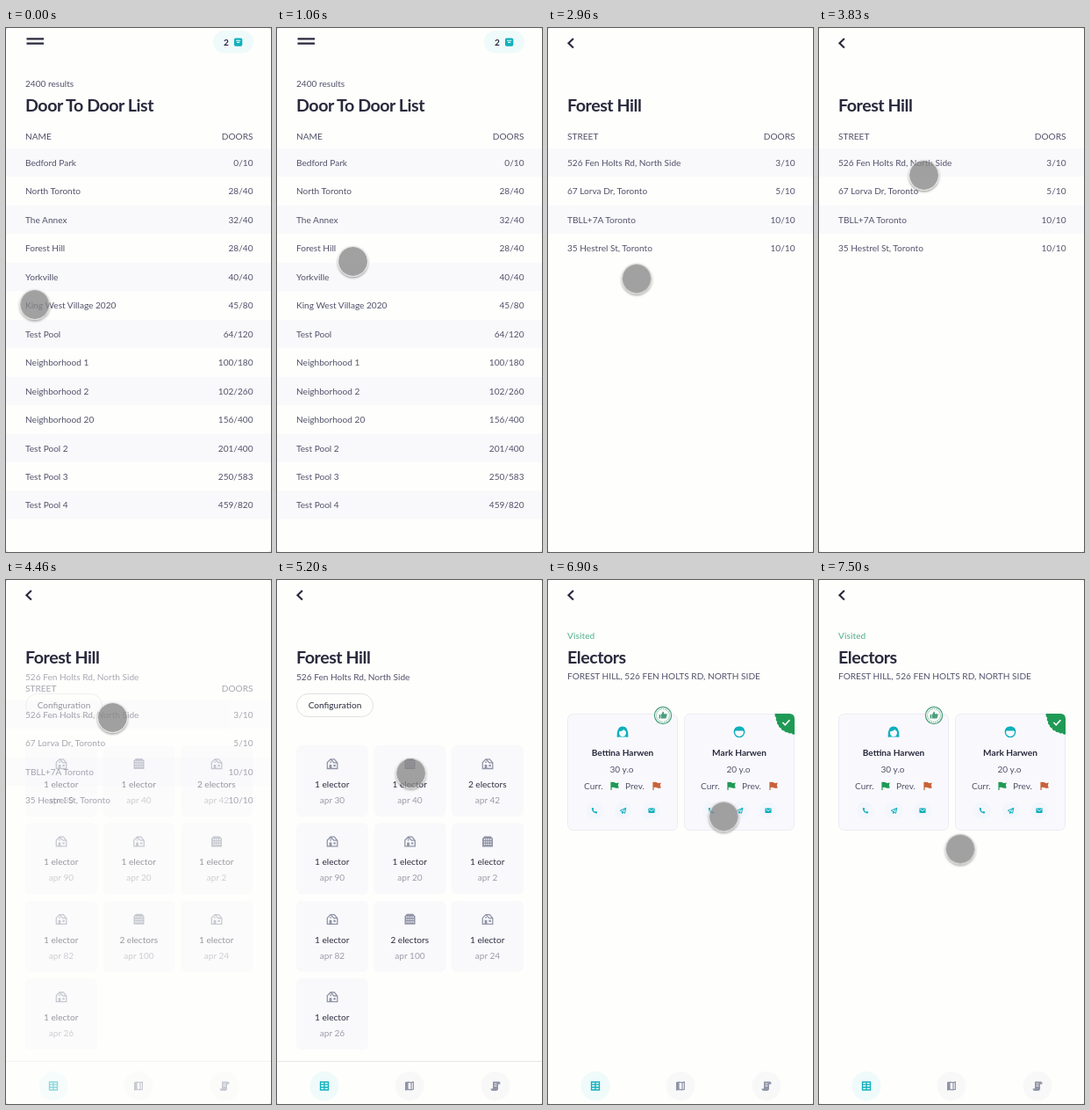
An HTML page for the animation above (8 s loop, 302 px wide and 596 px high).

```html
<!DOCTYPE html>
<html lang="en">
<head>
<meta charset="utf-8">
<title>Door to door list</title>
<style>
  html, body { margin: 0; width: 100%; height: 100%; overflow: hidden; background: #e2e2e2; }
  #stage { position: relative; width: 302px; height: 596px; overflow: hidden; }
  svg { position: absolute; inset: 0; display: block; }
  text { font: 10.1px Lato, sans-serif; fill: #52526b; }
  .title { font-size: 19.6px; font-weight: 700; letter-spacing: -.45px; fill: #29293d; }
  .bold { font-weight: 700; fill: #29293d; }
  .dark { fill: #2d2d40; }
  .pale { fill: #9c9cab; }
  .green { fill: #4fae88; letter-spacing: .1px; }
  .end { text-anchor: end; }
  .mid { text-anchor: middle; }
  .page { fill: #fefefc; }
  .soft { fill: #f9f9fb; }
  .line { fill: none; stroke: currentColor; }
  .teal { color: #0fb0bc; }
  .gray { color: #9094a6; }
  .fill { fill: currentColor; }

  #streets, #units, #people { animation: 8s linear infinite; }
  #streets { animation-name: streets; }
  #units { animation-name: units; }
  #people { animation-name: people; }
  @keyframes streets { 0%, 23.6% { opacity: 0 } 25%, 100% { opacity: 1 } }
  @keyframes units { 0%, 54.1% { opacity: 0 } 57.5%, 100% { opacity: 1 } }
  @keyframes people { 0%, 83.6% { opacity: 0 } 85.75%, 100% { opacity: 1 } }

  #cursor {
    position: absolute; left: -17.5px; top: -17.5px; width: 35px; height: 35px;
    box-sizing: border-box; border-radius: 50%;
    background: rgba(135, 135, 135, .78) padding-box;
    border: 1px solid rgba(225, 225, 225, .75);
    box-shadow: 0 1.5px 2.5px rgba(0, 0, 0, .36);
    animation: move 8s linear infinite, press 8s linear infinite;
  }
  @keyframes move {
    0% { translate: 32px 314px; animation-timing-function: ease-out }
    3.75%, 6.25% { translate: 80px 326px; animation-timing-function: ease-in }
    7.9% { translate: 85px 334px }
    9.75% { translate: 90px 312px }
    13.25% { translate: 86px 265px; animation-timing-function: ease-out }
    16.6%, 33.4% { translate: 84px 255px; animation-timing-function: ease-in-out }
    37% { translate: 100.5px 284.5px; animation-timing-function: ease-out }
    38.75%, 40.4% { translate: 102.5px 294px; animation-timing-function: ease-in }
    47.875% { translate: 119px 167px; animation-timing-function: ease-out }
    50%, 61.6% { translate: 121px 156px; animation-timing-function: ease-in }
    65% { translate: 152px 219px }
    67.9% { translate: 180px 271px }
    69% { translate: 186px 273px; animation-timing-function: ease-out }
    71.6%, 77.5% { translate: 195px 260.5px }
    77.875% { translate: 196.5px 259px; animation-timing-function: ease-out }
    79.5%, 83.75% { translate: 223.5px 245.5px; animation-timing-function: ease-in-out }
    89.5%, 92.9% { translate: 163px 304px }
    93.75%, 100% { translate: 160.5px 305.5px }
  }
  @keyframes press {
    0%, 17.1% { scale: 1 }
    17.5%, 23.7% { scale: .97 }
    24.6%, 52.1% { scale: 1 }
    52.5%, 54.1% { scale: .97 }
    55%, 80.9% { scale: 1 }
    81.25%, 83.7% { scale: .97 }
    84.2%, 100% { scale: 1 }
  }
</style>
</head>
<body>
<div id="stage">
  <svg id="scene" width="302" height="596" viewBox="0 0 302 596">
    <defs>
      <g id="back"><path class="line" d="M28.9 11.9 23.4 17.2l5.5 5.3" stroke-width="2.1" color="#29293d"/></g>
      <g id="house">
        <path class="line" d="M-5.7 5.5V-1.4L-2-5.2H2.4L5.8-1V5.5ZM-2-5.2 1.8-1.2H5.8" stroke-width="1.3"/>
        <path class="fill" d="M-3.4 1h2.8v4.5h-2.8zM1.4 1h2.4v2.2H1.4zM-2.7-2.6h1.6V-1h-1.6z"/>
      </g>
      <g id="tower">
        <path class="fill" d="M-6-3.4-3.6-6H3.6L6-3.4V6H-6z"/>
        <path d="M-4.2-2.4H4.6M-4.2.4H4.6M-4.2 3.2H4.6" stroke="#f9f9fb" stroke-width="1.3" stroke-dasharray="1.4 1"/>
      </g>
      <g id="table"><path class="line" d="M-4.5-4.5h9v9h-9zM-4.5-1.6h9M-4.5 1.5h9M0-4.5v9" stroke-width="1.3"/></g>
      <g id="map">
        <path class="line" d="M-4.4-3.8-1.6-4.4 1.6-3.8 4.4-4.4V3.8L1.6 4.4-1.6 3.8-4.4 4.4Z" stroke-width="1.2"/>
        <path class="fill" d="M-4.4-3.8-1.4-4.4V3.8L-4.4 4.4zM1.4-3.8 2.6-4V4.2L1.4 4.4z"/>
      </g>
      <g id="scroll">
        <path class="fill" d="M-3-5H4q1.4 0 1.4 1.6V-2H3V3.6Q3 5.4 1 5.4H-3.6Q-5.4 5.4-5.4 3.6V3H-3z"/>
        <path d="M-1.4-2.4H1.4M-1.4 0H1.4" stroke="#f8f8f9"/>
      </g>
      <g id="flag">
        <path class="fill" d="M-4.6-4.6h1.2V4.8h-1.2zM-3.4-4.2Q-1.4-5 .4-3.9T4.8-3.8L3.8-.8 4.8 2.2Q2 3 .2 2T-3.4 1.8z"/>
      </g>
      <g id="phone"><path class="fill" d="M-2.8-3-1.5-3.3-.7-1.5-1.5-.7Q-.9.8.7 1.5L1.5.7 3.3 1.5 3 2.8Q2.6 3.4 1.8 3.2-2.4 2.2-3.2-1.8-3.4-2.6-2.8-3z"/></g>
      <g id="plane"><path class="line" d="M-3.3 0 3.3-3 2 3-.6 1.4ZM-.6 1.4 3-2.7M-1 1.2V3.2L.6 2" stroke-width="1"/></g>
      <g id="mail">
        <rect class="fill" x="-3.6" y="-2.8" width="7.2" height="5.6" rx=".8"/>
        <path class="line" d="M-2.8-1.6 0 .3 2.8-1.6" color="#f3f8fc" stroke-width=".9"/>
      </g>
      <g id="woman">
        <path class="fill" d="M-6.4 5.4Q-7-6.4 0-6.4T6.4 5.4Q5.6 6.2 4 5.6H-4Q-5.6 6.2-6.4 5.4z"/>
        <path fill="#f9f9fd" d="M-4-.6Q0-1 1.6-3 2.6-1 4-.6 4.2 5 0 5T-4-.6z"/>
      </g>
      <g id="man">
        <circle class="line" r="5.6" stroke-width="1.4"/>
        <path class="fill" d="M-6.2.2Q-6.4-6.6 0-6.6T6.2.2L4.4-1.4H-4.4z"/>
      </g>
    </defs>
  </svg>
  <div id="cursor"></div>
</div>
<script>
  const text = (x, y, s, cls = '') => `<text x="${x}" y="${y}" class="${cls}">${s}</text>`;
  const title = s => text(22, 94.6, s, 'title');
  const icon = (id, x, y, cls = '') => `<use href="#${id}" x="${x}" y="${y}" class="${cls}"/>`;
  const dot = (x, y, r, fill) => `<circle cx="${x}" cy="${y}" r="${r}" fill="${fill}"/>`;
  const page = (id, body) =>
    `<g id="${id}"><rect class="page" width="302" height="596" rx="4"/>${body}</g>`;

  const list = (label, rows) =>
    text(22, 127.3, label) + text(281.5, 127.3, 'DOORS', 'end') +
    rows.map(([name, doors], i) => {
      const y = 137 + i * 32.45;
      const stripe = i % 2 ? '' : `<rect class="soft" y="${y}" width="302" height="32.4"/>`;
      return stripe + text(22, y + 20, name) + text(281.5, y + 20, doors, 'end');
    }).join('');

  const nav =
    dot(54, 575.5, 16.5, '#effafa') + dot(151, 575.5, 16.5, '#f8f8f9') + dot(249, 575.5, 16.5, '#f8f8f9') +
    icon('table', 54, 575.5, 'teal') + icon('map', 151, 575.5, 'gray') + icon('scroll', 249, 575.5, 'gray');

  const areas = [
    ['Bedford Park', '0/10'], ['North Toronto', '28/40'], ['The Annex', '32/40'],
    ['Forest Hill', '28/40'], ['Yorkville', '40/40'], ['King West Village 2020', '45/80'],
    ['Test Pool', '64/120'], ['Neighborhood 1', '100/180'], ['Neighborhood 2', '102/260'],
    ['Neighborhood 20', '156/400'], ['Test Pool 2', '201/400'], ['Test Pool 3', '250/583'],
    ['Test Pool 4', '459/820']
  ];
  const street = '526 Fen Holts Rd, North Side';
  const streets = [
    [street, '3/10'], ['67 Lorva Dr, Toronto', '5/10'],
    ['TBLL+7A Toronto', '10/10'], ['35 Hestrel St, Toronto', '10/10']
  ];

  const menu =
    '<path d="M23.5 12.4H43M23.5 17.6H43" stroke="#29293d" stroke-width="2.1"/>' +
    '<rect x="236" y="3" width="46" height="25.5" rx="12.7" fill="#effafa"/>' +
    text(248, 19.8, '2', 'bold') +
    '<rect x="260" y="11.5" width="9.3" height="9.3" rx="1.8" fill="#0fb0bc"/>' +
    '<path d="M262 14.2h5.3M263 16.4h3.3" stroke="#effafa" stroke-width="1.1"/>';

  const units = [30, 40, 42, 90, 20, 2, 82, 100, 24, 26].map((apr, i) => {
    const x = 22 + (i % 3) * 88.5, y = 188 + Math.floor(i / 3) * 88.4, mid = x + 41;
    const tower = [40, 2, 100].includes(apr);
    const count = [42, 100].includes(apr) ? '2 electors' : '1 elector';
    return `<rect class="soft" x="${x}" y="${y}" width="82" height="81" rx="6"/>` +
      icon(tower ? 'tower' : 'house', mid, y + 21, 'gray') +
      text(mid - .3, y + 48, count, 'mid dark') + text(mid, y + 66, 'apr ' + apr, 'mid pale');
  }).join('');

  const person = (x, face, name, age) =>
    `<rect x="${x + .5}" y="152.5" width="125" height="132" rx="6" fill="#f9f9fd" stroke="#ebebf4"/>` +
    icon(face, x + 63, 173, 'teal') +
    text(x + 63, 200.3, name, 'mid bold') + text(x + 62, 219.3, age + ' y.o', 'mid') +
    text(x + 19, 237.5, 'Curr.') + text(x + 66, 237.5, 'Prev.') +
    `<g color="#1f9a55">${icon('flag', x + 54, 234.3)}</g>` +
    `<g color="#c8623a">${icon('flag', x + 102, 234.3)}</g>` +
    ['phone', 'plane', 'mail'].map((id, i) =>
      dot(x + 31 + i * 32.5, 262.3, 10, '#f3f6fc') + icon(id, x + 31 + i * 32.5, 262.3, 'teal')).join('');

  const liked =
    dot(131, 154, 10.2, '#fafdfb') +
    '<g color="#4c9f7c"><circle class="line" cx="131" cy="154" r="9.6" stroke-width="1.2"/>' +
    '<circle class="line" cx="131" cy="154" r="7.4" stroke-width="1" stroke-dasharray="1.2 1.1"/>' +
    '<path class="fill" d="M126.6 153h1.8v4.4h-1.8zM129 153l2-3.4q1.4 0 1 2.6h3.2q.8.4.4 1.6l-1 3.2q-.3.6-1 .6H129z"/></g>';
  const done =
    '<path fill="#1f9a55" d="M258.5 152H275q6 0 6 6v17.5q-2.4.8-3.8-1.4-2.6 1.4-4.2-1-2.8.8-4-1.8-3 .2-3.4-2.8-3-.4-2.8-3.4-2.6-1.2-1.6-4-2.4-1.6-1-4.2-2.2-2-1.7-4.9z"/>' +
    '<path class="line" d="M267.4 162l2.8 2.8 5.2-5.6" color="#fff" stroke-width="1.6"/>';

  const back = icon('back', 0, 0);
  document.getElementById('scene').innerHTML +=
    page('areas', menu + text(22, 66.5, '2400 results') + title('Door To Door List') + list('NAME', areas)) +
    page('streets', back + title('Forest Hill') + list('STREET', streets)) +
    page('units', back + title('Forest Hill') + text(22, 114.2, street) +
      '<rect x="22.5" y="129.5" width="87" height="26" rx="13" fill="#fefefc" stroke="#e0e0e4"/>' +
      text(66, 146, 'Configuration', 'mid dark') + units +
      '<path d="M0 547.5H302" stroke="#e6e6ea"/>' + nav) +
    page('people', back + text(22, 66.5, 'Visited', 'green') + title('Electors') +
      text(22, 113.3, ('Forest Hill, ' + street).toUpperCase()) +
      person(22, 'woman', 'Bettina Harwen', 30) + person(155, 'man', 'Mark Harwen', 20) +
      liked + done + nav);
</script>
</body>
</html>
```
